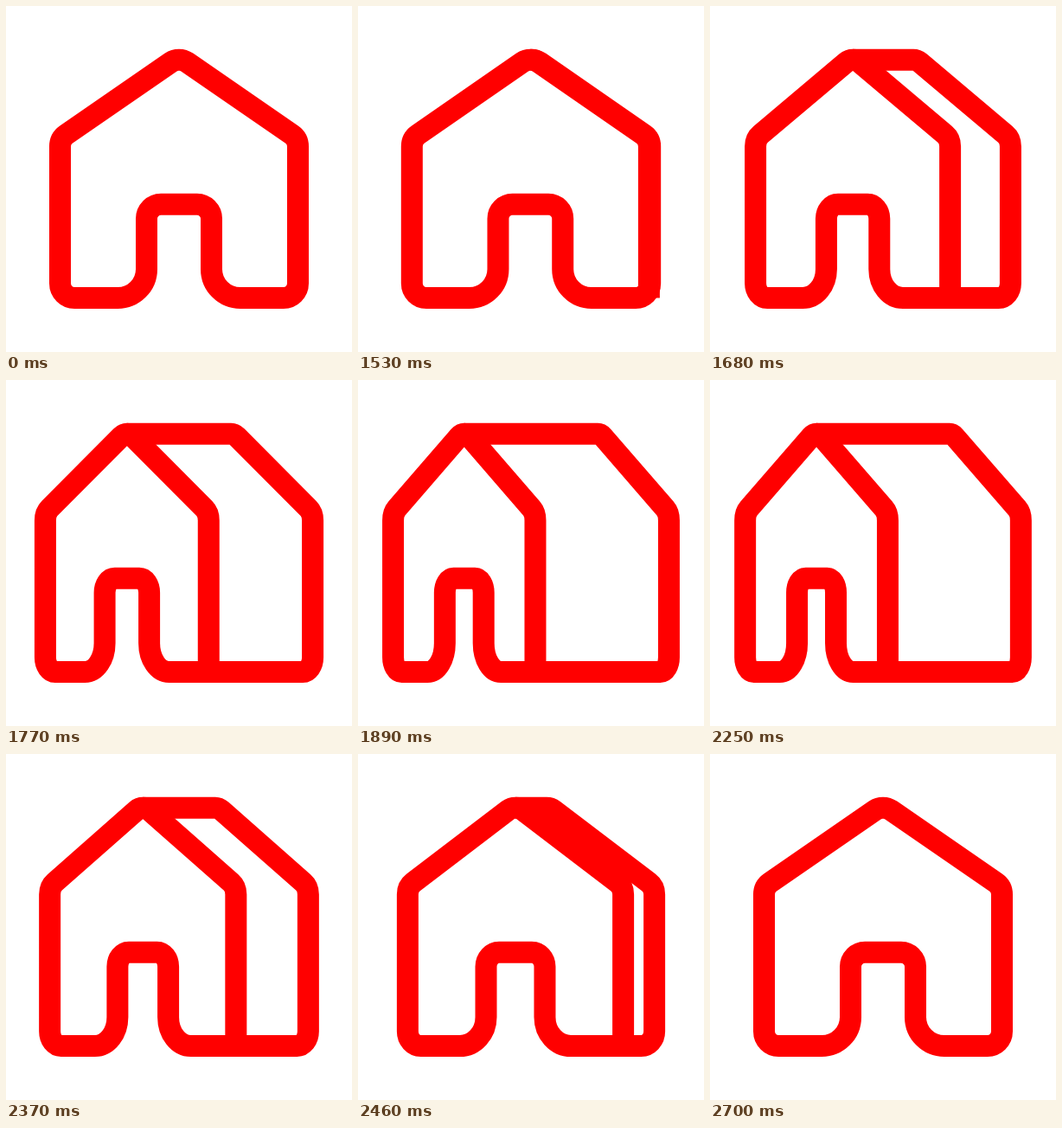
These frames come from a looping animation (400x400 px, 2730 ms). An HTML page:

```html
<!DOCTYPE html>
<html lang="en">
<head>
<meta charset="utf-8">
<title>Turning house</title>
<style>
  html, body { margin: 0; width: 100%; height: 100%; overflow: hidden; background: #fff; }
  svg { display: block; width: 100%; height: 100%; }
  path { fill: none; stroke: #f00; stroke-width: 25; stroke-linejoin: round; }
</style>
</head>
<body>
<svg viewBox="0 0 400 400">
  <path id="outline"></path>
  <path id="edge"></path>
</svg>
<script>
const LOOP = 2730, STEP = 30;
const START = 1500, PEAK = 2130, END = 2700;
const HALF = 137.5, MAX_SHIFT = 86.3, SQUEEZE = 0.716;
const R = 16.67, FLARE = 33.33;

const outline = document.getElementById("outline");
const edge = document.getElementById("edge");

// Cubic bezier easing with control points (x1, 0) and (x2, 1)
function ease(u, x1, x2) {
  let lo = 0, hi = 1;
  for (let i = 0; i < 30; i++) {
    const s = (lo + hi) / 2, q = 1 - s;
    if (3 * q * q * s * x1 + 3 * q * s * s * x2 + s * s * s < u) lo = s;
    else hi = s;
  }
  return lo * lo * (3 - 2 * lo);
}

function turn(t) {
  if (t <= START || t >= END) return 0;
  return t < PEAK
    ? ease((t - START) / (PEAK - START), 0.333, 0.2)
    : 1 - ease((t - PEAK) / (END - PEAK), 0.434, 0.336);
}

function draw(t) {
  const shift = MAX_SHIFT * turn(t);
  const k = 1 - SQUEEZE * shift / HALF;
  const front = 200 - shift, back = 200 + shift;

  const line = (c, x, y) => `L${c + k * x} ${y}`;
  const arc = (c, x, y, sweep, r = R) => `A${k * r} ${r} 0 0 ${sweep} ${c + k * x} ${y}`;

  const top = `M${front} 62.2`;
  const leftSide =
    arc(front, -9.47, 65.1, 0) + line(front, -130.3, 148.5) +
    arc(front, -HALF, 162.2, 0) + line(front, -HALF, 320.83) +
    arc(front, R - HALF, 337.5, 0);
  const door =
    line(front, -37.5 - FLARE, 337.5) + arc(front, -37.5, 337.5 - FLARE, 0, FLARE) +
    line(front, -37.5, 245.83) + arc(front, R - 37.5, 229.17, 1) +
    line(front, 37.5 - R, 229.17) + arc(front, 37.5, 245.83, 1) +
    line(front, 37.5, 337.5 - FLARE) + arc(front, 37.5 + FLARE, 337.5, 0, FLARE);
  const backSide =
    line(back, HALF - R, 337.5) + arc(back, HALF, 320.83, 0) +
    line(back, HALF, 162.2) + arc(back, 130.3, 148.5, 0) +
    line(back, 9.47, 65.1) + arc(back, 0, 62.2, 0);

  outline.setAttribute("d", top + leftSide + door + backSide + "Z");
  // The front wall's right edge merges with the outline when seen head-on
  edge.setAttribute("d", shift ? top +
    arc(front, 9.47, 65.1, 1) + line(front, 130.3, 148.5) +
    arc(front, HALF, 162.2, 1) + line(front, HALF, 337.5) : "");
}

const origin = performance.now();
function tick() {
  const t = (performance.now() - origin) % LOOP;
  draw(Math.floor(t / STEP) * STEP);
  requestAnimationFrame(tick);
}
tick();
</script>
</body>
</html>
```
